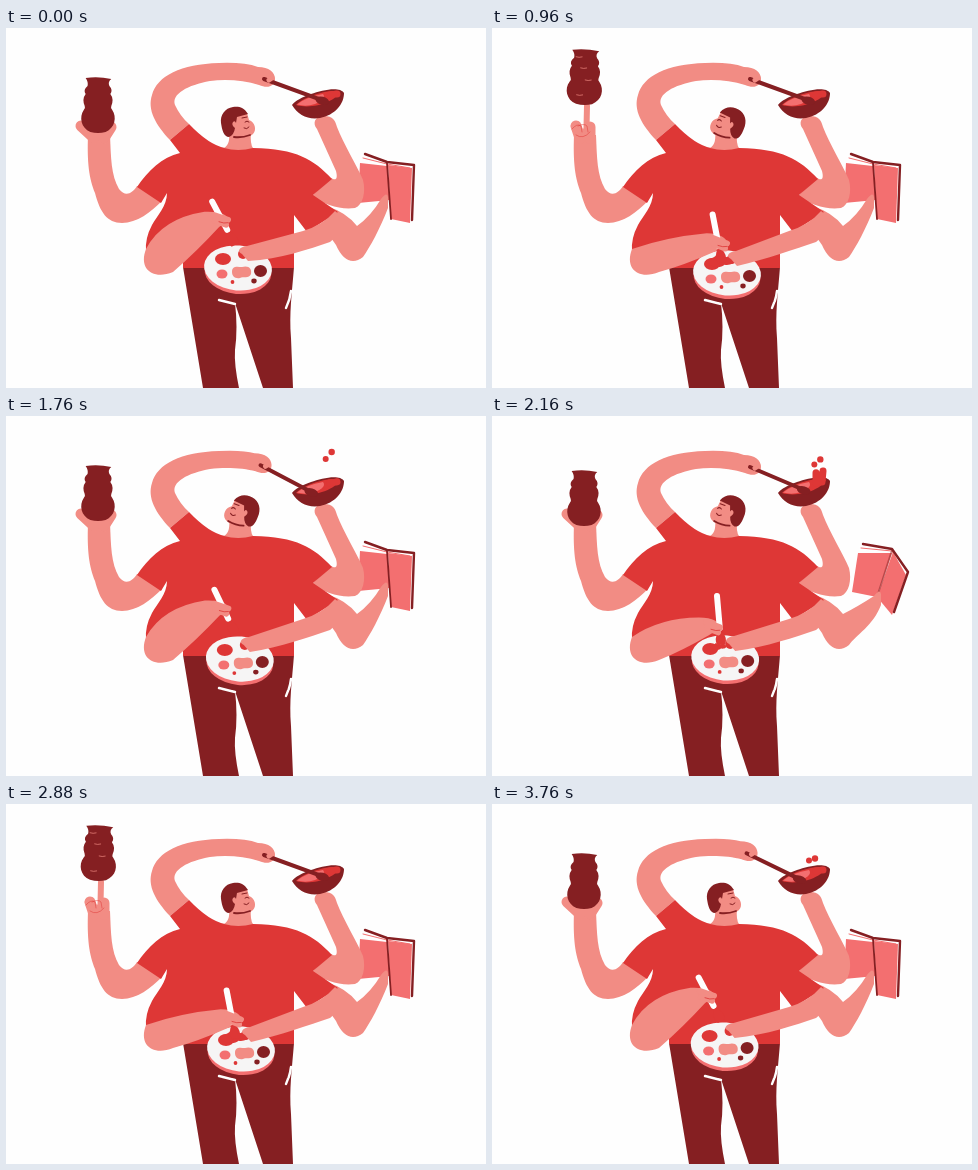
Animation, 480 px wide and 360 px high, one loop 3.84 s. Source, as an HTML page:

```html
<!DOCTYPE html>
<html lang="en">
<head>
<meta charset="utf-8">
<title>Many-armed maker</title>
<style>
html, body { margin: 0; width: 100%; height: 100%; overflow: hidden; background: #fefefe; }
svg { display: block; width: 100vw; height: 100vh; }
.skin { fill: #f28c84; }
.red { fill: #de3736; }
.dark { fill: #851f22; }
.pink { fill: #f36f70; }
.white { fill: #f6f5f5; }
.line { fill: none; stroke-linecap: round; stroke-linejoin: round; }
.ld { stroke: #851f22; }
.lw { stroke: #fefefe; }
.ls { stroke: #f28c84; }
.lr { stroke: #de3736; }
</style>
</head>
<body>
<svg viewBox="0 0 480 360">
  <defs><clipPath id="edge"><path d="M0 60L77 22L103 10H480V360H0Z"/></clipPath></defs>

  <!-- arm over the head -->
  <path id="topArm" class="skin"/>

  <!-- book and the arm holding it -->
  <path id="sheets" class="line lw" stroke-width="4"/>
  <path id="pageL" class="pink"/>
  <path id="pageR" class="pink"/>
  <path id="sheetLine" class="line" stroke="#f36f70" stroke-width="1"/>
  <path id="cover" class="line ld" stroke-width="2.4"/>
  <path id="ribbon" class="line ld" stroke-width="1.8"/>
  <path id="bookArm" class="skin"/>

  <!-- bowl arm -->
  <path class="skin" d="M306 168L325 150C330 153 332 151 330 143L311 101C306 95 309 88 318 88C327 88 329 92 331 99C337 115 351 138 357 152C360 164 357 177 349 180C335 182 318 177 306 168Z"/>

  <!-- pot arm -->
  <path class="skin" d="M82 107C81 135 83 150 89 165C94 184 101 195 116 195C131 195 145 184 156 173L131 158C126 166 119 169 113 161C105 147 105 130 104 107Z"/>
  <path id="finger" class="line ls" stroke-width="6"/>
  <path id="potHand" class="line ls" stroke-width="11"/>
  <path id="knuckles" class="line lr" stroke-width=".7" d="M80 101Q85 95 89 98L90 104M86 98Q92 95 95 98L96 104M84 107Q91 112 98 104"/>
  <g clip-path="url(#edge)"><g id="pot">
    <path class="dark" d="M-13-54Q0-56 14-53Q10-50 12-46Q16-42 13-38Q17-33 14-26Q13-24 15-22C20-15 18-4 8 0Q0 2-8 0C-18-4-20-15-15-22Q-13-24-14-26Q-17-33-13-38Q-16-42-11-46Q-10-50-13-54Z"/>
    <path id="marks" class="line ls" stroke-width=".9"/>
  </g></g>

  <!-- trousers and shirt -->
  <path class="dark" d="M177 239H288C286 265 283 285 285 310L287 360H257L229 275Q232 300 229 322Q228 336 233 360H197Z"/>
  <path class="line lw" stroke-width="2.4" d="M213 272L229 276M285 263Q284 272 280 280"/>
  <path class="red" d="M219 120Q203 117 183 96L164 112L174 125C156 129 142 143 131 159L155 175L161 165C161 178 151 188 146 197Q139 210 140 223L177 222V240H288V187L301 204L332 184L307 167L326 151C307 131 291 121 247 120Z"/>

  <!-- head -->
  <path class="skin" d="M223 101C224 112 223 117 218 120Q232 124 247 120Q244 116 245 104Z"/>
  <g id="head">
    <path class="skin" d="M241 85L243 92C249 94 251 102 247 106C243 110 236 110 224 112L221 90Z"/>
    <path class="dark" d="M242 86C238 79 232 78 227 79C219 80 214 87 215 95C216 102 218 109 223 109Q228 107 229 100Q225 97 227 94Q229 92 230 95L231 89Z"/>
    <path class="line ld" stroke-width="1" d="M236 90L241 89M239 94Q241 92 243 94M238 100Q241 102 243 99"/>
    <path class="line ld" stroke-width="1.8" d="M228 109Q236 110 244 107"/>
  </g>

  <!-- bowl -->
  <circle id="dropA" class="red" r="3.2"/>
  <circle id="dropB" class="red" r="3"/>
  <path class="dark" d="M286 77C292 87 302 92 314 90C329 87 338 76 338 65C334 58 316 62 305 66C296 69 289 73 286 77Z"/>
  <path class="red" d="M290 77C297 69 324 60 334 64C330 73 307 82 290 77Z"/>
  <path class="pink" d="M291 76.500Q300 69 317 66Q321 71 309 76Q300 79 291 76.500Z"/>
  <path id="lump" class="line lr" stroke-width="7"/>
  <path id="spoon" class="line ld" stroke-width="4"/>
  <ellipse id="spoonEnd" class="dark" rx="7" ry="4"/>
  <path id="topThumb" class="line ls" stroke-width="5"/>

  <!-- palette -->
  <g id="palette">
    <ellipse class="pink" cx="232" cy="243.500" rx="33.500" ry="22.500" transform="rotate(5 232 243)"/>
    <ellipse class="white" cx="232" cy="240" rx="34" ry="22.500" transform="rotate(5 232 240)"/>
    <ellipse class="red" cx="217" cy="231" rx="8" ry="6"/>
    <ellipse class="red" cx="237" cy="226" rx="5" ry="5"/>
    <ellipse class="pink" cx="216" cy="246" rx="5.500" ry="4.500"/>
    <path class="skin" d="M226 244C226 237 232 239 236 239C243 237 246 241 245 246C243 251 237 248 234 250C229 251 226 248 226 244Z"/>
    <ellipse class="dark" cx="254.500" cy="243" rx="6.500" ry="6"/>
    <circle class="red" cx="226.500" cy="254" r="1.900"/>
    <ellipse class="dark" cx="248" cy="253" rx="2.700" ry="2.400"/>
    <g id="paint">
      <path class="red" d="M-15 1C-15-5-7-3-4-8Q1-2 4-4Q9-8 14-3C18 2 10 4 5 3C1 7-8 7-15 1Z"/>
      <circle class="white" cx="-1" cy="-6" r="1.500"/><circle class="white" cx="4" cy="-5" r="1.300"/>
    </g>
  </g>
  <path id="paletteArm" class="skin"/>

  <!-- painting arm -->
  <path id="paintArm" class="skin"/>
  <g id="brush">
    <path class="line lw" stroke-width="6" d="M0-23V9"/>
    <path class="red" d="M-2 12H2Q7 20 4 26H-4Q-7 20-2 12Z"/>
  </g>
  <path id="grip" class="line ls" stroke-width="6"/>
  <path id="gripLine" class="line lr" stroke-width=".8"/>
</svg>
<script>
const LOOP = 3840, HALF = 1920, STIR = 480;
const el = {};
document.querySelectorAll('[id]').forEach(n => el[n.id] = n);

const set = (id, name, value) => el[id].setAttribute(name, value);
const path = (id, d) => set(id, 'd', d);
const show = (id, on, alpha = 1) => set(id, 'opacity', on ? alpha : 0);
const mix = (a, b, k) => a + (b - a) * k;
const mixAll = (a, b, k) => a.map((v, i) => mix(v, b[i], k));
const clamp = k => Math.min(1, Math.max(0, k));
const ease = k => k * k * (3 - 2 * k);
const ramp = (t, a, b) => ease(clamp((t - a) / (b - a)));
const hold = (t, a, b, c, d) => ramp(t, a, b) - ramp(t, c, d);
const bump = (t, a, b) => Math.sin(Math.PI * clamp((t - a) / (b - a))) ** 2;
const wave = (t, period) => Math.sin(2 * Math.PI * t / period);
const add = ([x, y], dx, dy) => [x + dx, y + dy];
const poly = points => 'M' + points.join('L');

function drawPot(m) {
  const k = hold(m, 350, 460, 1610, 1720);
  const spin = hold(m, 340, 440, 1600, 1740);
  let y = 104 + 5 * bump(m, 120, 360);
  if (m > 340) y = m < 540 ? 50 + 54 * ((540 - m) / 200) ** 2 : 50 + 26 * Math.min(1, (m - 540) / 180) ** 2;
  if (m > 1600) y = mix(76, 104, ramp(m, 1600, 1740));
  const tilt = 1.5 * spin * Math.sin(m / 70);
  set('pot', 'transform', `translate(92 ${y}) rotate(${tilt}) scale(${mix(.95, 1, spin)} 1)`);
  path('potHand', `M88 110L${mix(75, 84, k)} 98M98 110L${mix(105, 98, k)} 99M89 106H97`);
  path('finger', `M94.500 100L95 ${mix(102, 78, k)}`);
  show('finger', k > .05);
  show('knuckles', k > .8, .7);
  let d = '';
  [-47, -36, -24, -9].forEach((row, i) => {
    const p = (m / 240 + i * .37) % 1;
    d += `M${mix(-9, 4, p)} ${row}q3 1 6 0`;
  });
  path('marks', d);
  show('marks', spin > .9, .75);
}

// corners: left top, spine top, right top, right bottom, spine bottom, left bottom
const OPEN = [[356, 130], [381, 135], [408, 137], [406, 194], [385, 191], [352, 175]];
const SHUT = [[368, 132], [400, 134], [416, 156], [402, 198], [385, 181], [360, 176]];

function drawBook(m) {
  const k = hold(m, 80, 220, 340, 520);
  const [lt, st, rt, rb, sb, lb] = OPEN.map((p, i) => mixAll(p, SHUT[i], k));
  const low = mixAll(st, sb, mix(.66, 1, k));
  path('pageL', poly([add(lt, -2, 5), add(st, 0, 3), low, lb]) + 'Z');
  path('pageR', poly([add(st, 1, 2), add(rt, -2, 3), add(rb, -2, 1), sb]) + 'Z');
  const inner = poly([add(lt, 1, 0), add(st, 0, 1), add(rt, -4, 3), add(rb, -3, -5)]);
  path('sheets', inner);
  path('sheetLine', inner);
  path('cover', poly([add(lt, 3, -4), add(st, 0, -1), rt, add(rb, 0, -2)]));
  path('ribbon', `M${st}Q${mixAll(st, sb, .6)} ${sb}`);
  show('ribbon', true, 1 - .5 * k);
  const x = 382 + 7 * k, y = 169 + 9 * k;
  path('bookArm', `M320 178Q340 184 351 198Q365 ${188 + 3 * k} ${x - 7} ${y + 2}Q${x - 1} ${y - 6} ${x} ${y}V${y + 11}C${x - 8} ${y + 32} 364 219 357 229C347 237 337 233 330 217L318 200Z`);
}

function drawHead(t) {
  const tilt = 10 * hold(t, 640, 800, 2400, 2540);
  const left = t >= 600 && t < 2640;
  set('head', 'transform', left ? `rotate(${tilt} 234 107) translate(466 0) scale(-1 1)` : '');
}

function drawDrop(id, s, apex, x) {
  const k = (s - 320) / (s < 320 ? 150 : 95);
  set(id, 'cx', x - 6 * clamp((s - 220) / 180));
  set(id, 'cy', mix(apex, 62, k * k));
  show(id, Math.abs(k) < 1);
}

function drawBowl(s) {
  const swing = wave(s, STIR), turn = wave(s + 20, STIR);
  const dx = 4 * swing, dy = 2 * swing;
  const ex = 315 + 9 * turn, ey = 73.5 - 3 * turn;
  path('topArm', `M164 112C150 97 141 82 146 67C151 48 175 36 213 35Q238 34 ${252 + dx} ${39 + dy}C${263 + dx} ${39 + dy} ${269 + dx} ${44 + dy} ${269 + dx} ${51 + dy}C${269 + dx} ${58 + dy} ${262 + dx} ${61 + dy} ${253 + dx} ${57 + dy}C238 52 219 51 204 53C182 57 165 66 169 77Q174 88 183 96Z`);
  path('spoon', `M${258 + dx} ${51 + dy}L${ex} ${ey}`);
  set('spoonEnd', 'transform', `translate(${ex - 1} ${ey}) rotate(15)`);
  path('topThumb', `M${266 + dx} ${50 + dy}l-3 2`);
  const k = bump(s, 40, 330);
  path('lump', `M324 67V${67 - 15 * k}M330 66L331 ${66 - 16 * k}`);
  drawDrop('dropA', s, 36, 329);
  drawDrop('dropB', s, 43, 323);
}

// wrist x, y, forearm bend, brush x, y, brush angle
const LIFT = [204, 191, 26, 217, 194, -28];
const DIP = [210, 210, 20, 227, 203, -5];
const GRIP = [214, 214, 10, 225, 211, 13];
const FLAT = [217, 214, 14, 225, 209, -11];
const POSES = [[0, LIFT], [80, LIFT], [240, DIP], [480, GRIP], [740, GRIP], [900, FLAT],
  [1020, FLAT], [1160, GRIP], [1600, GRIP], [1780, LIFT], [HALF, LIFT]];

function poseAt(m) {
  const i = POSES.findIndex(p => p[0] > m);
  const [t0, a] = POSES[i - 1], [t1, b] = POSES[i];
  return mixAll(a, b, ramp(m, t0, t1));
}

function drawPainting(m) {
  const work = ramp(m, 0, 560) - ramp(m, 1640, HALF);
  const dx = 3 * work, dy = 5 * work;
  set('palette', 'transform', `translate(${dx} ${dy})`);
  set('paint', 'transform', `translate(225 229) scale(${.65 * bump(m, 160, 380) + bump(m, 840, 1140)})`);
  path('paletteArm', `M329 183Q317 197 297 203L${241 + dx} ${218 + dy}C${232 + dx} ${219 + dy} ${231 + dx} ${224 + dy} ${236 + dx} ${226 + dy}L${242 + dx} ${233 + dy}C275 231 303 221 324 214L345 196Z`);

  const [wx, wy, bend, bx, by, angle] = poseAt(m);
  const stir = 2 * work * wave(m, STIR);
  const len = Math.hypot(wx - 152, wy - 231), nx = (231 - wy) / len, ny = (wx - 152) / len;
  const off = (x, y, d) => [x + nx * d, y + ny * d];
  const midX = (wx + 152) / 2, midY = (wy + 231) / 2;
  const [fx, fy] = [wx + 18, wy + 3 - nx * 2];
  path('paintArm', `M140 221Q${off(midX - 6, midY, -bend)} ${off(wx, wy, -9)}Q${fx} ${wy - 8} ${fx} ${fy}L${off(wx + 3, wy, 10)}Q${off(midX + 4, midY, 15)} 167 244C148 252 132 242 140 221Z`);
  set('brush', 'transform', `translate(${bx - stir} ${by}) rotate(${angle - stir})`);
  path('grip', `M${wx + 4} ${wy - 4}L${fx} ${fy - 1}M${wx + 5} ${wy + 2}L${fx - 2} ${fy + 4}`);
  path('gripLine', `M${fx - 9} ${fy + 1}q5 2 9 1`);
}

function draw(t) {
  drawPot(t % HALF);
  drawBook(t % HALF);
  drawHead(t);
  drawBowl(t % STIR);
  drawPainting(t % HALF);
}

const start = performance.now();
function tick(now) {
  const t = Math.max(0, now - start) % LOOP;
  draw(Math.floor(t / 40) * 40);
  requestAnimationFrame(tick);
}
draw(0);
requestAnimationFrame(tick);
</script>
</body>
</html>
```
